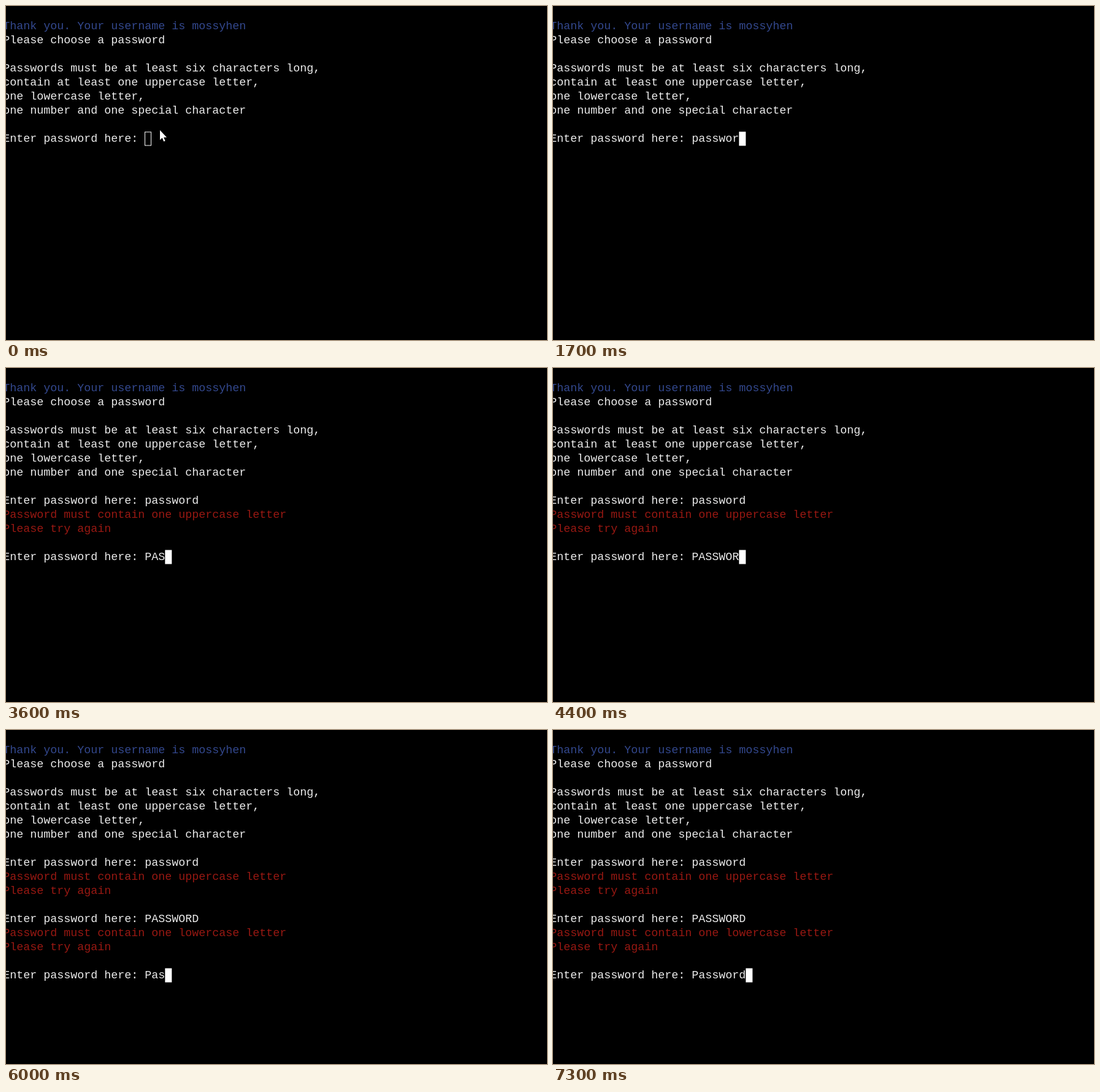
An HTML page that plays this animation: 882x546 px, repeating every 8 s.

```html
<!DOCTYPE html>
<html lang="en">
<head>
<meta charset="utf-8">
<title>Password prompt</title>
<style>
html, body { margin: 0; width: 100%; height: 100%; overflow: hidden; background: #000; }
svg { display: block; width: 882px; height: 546px; }
text { font: 18.333px "Liberation Mono", "Courier New", monospace; white-space: pre; fill: #ececec; }
.info { fill: #33488e; }
.error { fill: #981812; }
</style>
</head>
<body>
<svg viewBox="0 0 882 546">
  <rect width="882" height="546" fill="#000"/>
  <g id="lines"></g>
  <rect id="block" width="11" height="23" fill="#fff"/>
  <g id="idle">
    <rect x="226.5" y="206" width="10" height="22" fill="none" stroke="#fff"/>
    <path d="M251 203V219L254.7 215.6L257.2 221.4L259.6 220.4L257.1 214.8H262Z" fill="#fff"/>
  </g>
</svg>
<script>
const LOOP = 8000, LEFT = -4.7, TOP = 21.5, CELL = 11, ROW = 23, BASE = 16.5;
const PROMPT = "Enter password here: ";
const $ = id => document.getElementById(id);

// One key time per letter; enter moves the cursor down, reply prints the error.
const attempts = [
  { word: "password", keys: [100, 400, 600, 800, 1300, 1500, 1600, 1800],
    enter: 2000, reply: 2300, missing: "uppercase" },
  { word: "PASSWORD", keys: [3000, 3300, 3600, 3700, 3900, 4100, 4400, 4600],
    enter: 4900, reply: 5300, missing: "lowercase" },
  { word: "Password", keys: [5700, 5900, 6000, 6300, 6700, 6900, 7100, 7300],
    enter: Infinity, reply: Infinity }
];

function addLine(row, content, style = "") {
  const line = document.createElementNS("http://www.w3.org/2000/svg", "text");
  line.setAttribute("x", LEFT);
  line.setAttribute("y", TOP + row * ROW + BASE);
  line.setAttribute("class", style);
  line.textContent = content;
  $("lines").append(line);
  return line;
}

function show(el, on) {
  el.setAttribute("visibility", on ? "visible" : "hidden");
}

addLine(0, "Thank you. Your username is mossyhen", "info");
[
  "Please choose a password", "",
  "Passwords must be at least six characters long,",
  "contain at least one uppercase letter,",
  "one lowercase letter,",
  "one number and one special character"
].forEach((s, i) => addLine(i + 1, s));

attempts.forEach((a, i) => {
  a.row = 8 + 4 * i;
  a.start = i ? attempts[i - 1].reply : 0;
  a.line = addLine(a.row, PROMPT);
  a.errors = a.missing ? [
    addLine(a.row + 1, `Password must contain one ${a.missing} letter`, "error"),
    addLine(a.row + 2, "Please try again", "error")
  ] : [];
});

function draw(t) {
  let col = 0, row = 0;
  for (const a of attempts) {
    const typed = a.keys.filter(k => k <= t).length;
    a.line.textContent = PROMPT + a.word.slice(0, typed);
    show(a.line, t >= a.start);
    a.errors.forEach(e => show(e, t >= a.reply));
    if (t >= a.start) {
      const entered = t >= a.enter;
      col = entered ? 0 : PROMPT.length + typed;
      row = a.row + (entered ? 1 : 0);
    }
  }
  const idle = t < attempts[0].keys[0];
  $("block").setAttribute("x", LEFT + col * CELL);
  $("block").setAttribute("y", TOP + row * ROW);
  show($("block"), !idle);
  show($("idle"), idle);
}

function frame() {
  draw(performance.now() % LOOP);
  requestAnimationFrame(frame);
}
frame();
</script>
</body>
</html>
```
